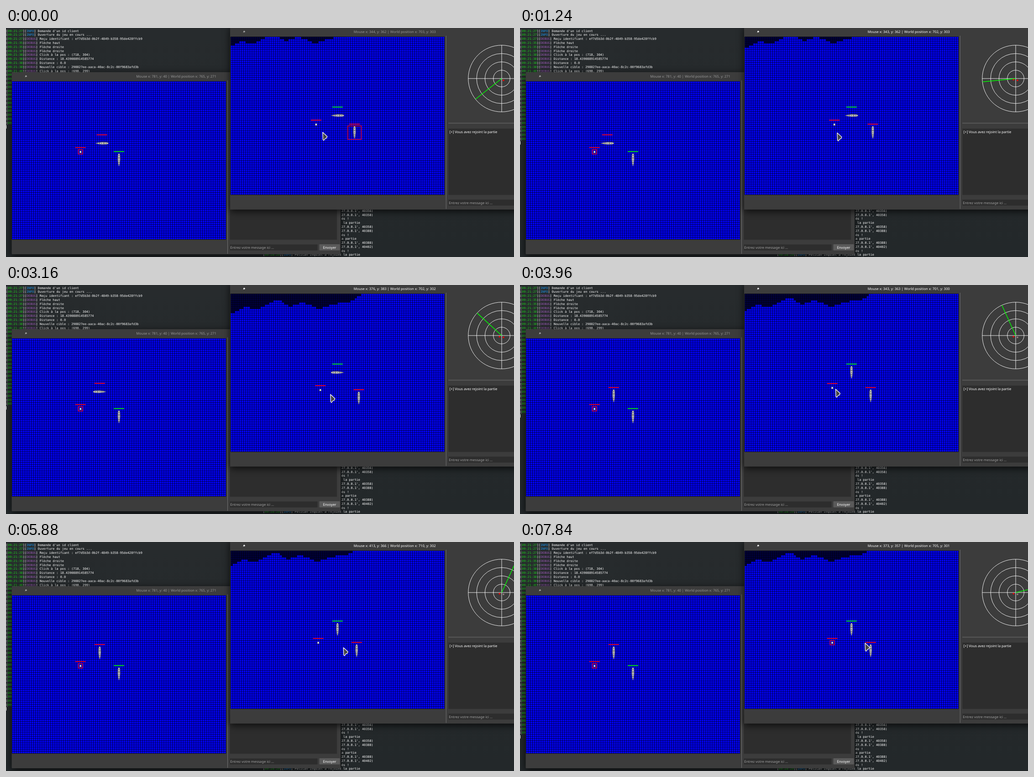
Write an HTML page that moves like this. It is 1113 by 503 pixels and loops after 8000 ms.

```html
<!DOCTYPE html>
<html lang="fr">
<head>
<meta charset="utf-8">
<title>Bataille navale</title>
<style>
  html, body { margin: 0; width: 100%; height: 100%; overflow: hidden; background: #25292b; }
  svg { display: block; width: 1113px; height: 503px; }
  text { white-space: pre; text-rendering: geometricPrecision; fill: #fff; }
  .term text { font: 6.8px "DejaVu Sans Mono", monospace; }
  .ui { font: 7.72px "Noto Sans", sans-serif; }
  .title { font: 7.58px "Noto Sans", sans-serif; text-anchor: middle; fill: #989898; }
  .hint { fill: #a2a2a2; }
  .time { fill: #1fd41f; }
  .INFO { fill: #1d99f3; }
  .DEBUG { fill: #9b59b6; }
  .window { filter: drop-shadow(0 4px 8px rgba(0, 0, 0, .75)); }
  .frame { fill: #3c3c3c; }
  .field { fill: #2d2d2d; stroke: #333; stroke-width: .6; }
  .rule { stroke: #777; stroke-width: .9; }
  .pin { fill: #aaa; }
  .focus { fill: #fff; }
  .grid { stroke: #000; stroke-width: .68; fill: none; }
  .pick { fill: none; stroke: #f00; stroke-width: 1.3; }
  .radar { fill: none; stroke: #fff; stroke-width: .9; }
</style>
</head>
<body>
<svg viewBox="0 0 1113 503">
  <defs>
    <linearGradient id="back" x2="0" y2="1">
      <stop offset="0" stop-color="#272b2d"/>
      <stop offset="1" stop-color="#23282a"/>
    </linearGradient>
    <clipPath id="view"><rect x="492" y="19" width="469" height="347"/></clipPath>
    <path id="pin" d="M-.6 -2.4 2.6 .3 1 .6 .2 2-1 .9-2.8 2.8-1.6 .3-2.4-.8-.9-.9Z"/>
    <g id="ship">
      <path d="M14.3 0 8 -1.8-2-2.7-11-2.3-14.3-1V1L-11 2.3-2 2.7 8 1.8Z" fill="#c4c4c4" stroke="#333" stroke-width=".5"/>
      <path d="M-11 0H-8M-6 -1H-3M-6 1H-3M-1 0H2M4 -.6H6M4 .6H6M8 0H10" stroke="#303030" stroke-width=".9"/>
    </g>
    <path id="boat" d="M-2 2.4V-.6L-.8 -2.3H.8L2 -.6V2.4Z" fill="#ddd" stroke="#222" stroke-width=".5"/>
  </defs>

  <rect width="1113" height="503" fill="url(#back)"/>
  <g id="term" class="term"></g>

  <g class="window">
    <rect class="frame" x="12.5" y="97" width="720.5" height="400" rx="1.5"/>
    <rect class="field" x="490.5" y="380" width="234.5" height="85"/>
    <rect class="field" x="490.5" y="475.5" width="192" height="13" rx="1"/>
    <rect x="686.5" y="475" width="45" height="13.5" rx="1" fill="#5a5a5a"/>
    <path class="rule" d="M485.5 115V496"/>
  </g>
  <use href="#pin" class="pin" x="44" y="106"/>
  <text class="title" x="373" y="109.3">Mouse x: 781, y: 40 | World position x: 765, y: 271</text>
  <text class="ui hint" x="491.3" y="484.5">Entrez votre message ici ...</text>
  <text class="ui" x="694.5" y="484.5">Envoyer</text>

  <g class="window">
    <rect class="frame" x="491" y="-4" width="640" height="402.8"/>
    <rect class="field" x="969.3" y="221" width="160" height="145.5"/>
    <rect class="field" x="969.3" y="377" width="160" height="13"/>
    <path class="rule" d="M964.3 17V397.5M969 209H1113"/>
  </g>
  <use id="pinR" href="#pin" class="pin" x="522" y="8"/>
  <text id="title" class="title" x="851.7" y="11.3"></text>
  <text class="ui" x="971.8" y="230.6">[+] Vous avez rejoint la partie</text>
  <text class="ui hint" x="970.3" y="386.6">Entrez votre message ici ...</text>

  <g id="radar" class="radar"><path d="M1012.8 111H1113M1086 37.8V184.2"/></g>
  <path id="sweep" d="M1086 111h73" stroke="#0f0" stroke-width="1.4"/>
  <circle id="blipA" cx="1081.3" cy="113.5" r="1.8" fill="#f00"/>
  <circle id="blipB" cx="1090" cy="115" r="1.8" fill="#f00"/>

  <rect x="13" y="117" width="469" height="347" fill="#00f"/>
  <rect x="492" y="19" width="469" height="347" fill="#00f"/>
  <g clip-path="url(#view)"><path id="land" fill="#00003c"/></g>
  <g id="units"></g>
  <path id="cursor" d="M.3 .5 10.2 9.6 8.8 13.2 6 14 2.8 18.4 1 17Z" fill="#454545" stroke="#fff" stroke-width="1.3" stroke-linejoin="round"/>
</svg>
<script>
const LOOP = 8000, CELL = 4.686, COLS = 100, LINES = 74, ROW = 8.78;
const SEA = { left: [13.3, 117.8], right: [492.2, 19.6] };
const $ = id => document.getElementById(id);

function add(parent, tag, attrs, text) {
  const el = document.createElementNS('http://www.w3.org/2000/svg', tag);
  for (const k in attrs) el.setAttribute(k, attrs[k]);
  if (text) el.textContent = text;
  return parent.appendChild(el);
}
const place = (el, x, y) => el.setAttribute('transform', `translate(${x} ${y})`);
const show = (el, on) => el.style.display = on ? '' : 'none';

// Values at t along straight pieces between [t, ...values] points
function along(points, t) {
  const i = points.findLastIndex(p => p[0] <= t);
  const a = points[i], b = points[i + 1] || a;
  const p = a === b ? 0 : (t - a[0]) / (b[0] - a[0]);
  return a.slice(1).map((v, j) => v + (b[j + 1] - v) * p);
}

// Terminal output
function logLine(x, y, time, level, message) {
  const line = add($('term'), 'text', { x, y: y + 2.4 });
  const span = (cls, s) => add(line, 'tspan', { class: cls }, s);
  span('', '['); span('time', '09:' + time); span('', '][');
  span(level, level); span('', '] ' + message);
  return line;
}
[
  ['21:27', 'INFO', "Demande d'un id client"],
  ['21:27', 'INFO', 'Ouverture du jeu en cours ...'],
  ['21:27', 'DEBUG', 'Reçu identifiant : ef7d5b3d-0b2f-4849-b358-95de428ffcb9'],
  ['21:35', 'DEBUG', 'Flèche haut'],
  ['21:35', 'DEBUG', 'Flèche droite'],
  ['21:37', 'DEBUG', 'Flèche droite'],
  ['21:38', 'DEBUG', 'Click à la pos : (718, 304)'],
  ['21:38', 'DEBUG', 'Distance : 18.439088914585774'],
  ['21:38', 'DEBUG', 'Distance : 0.0'],
  ['21:38', 'DEBUG', 'Nouvelle cible : 298827ee-aaca-40ac-8c2c-00f9683afd3b'],
  ['21:40', 'DEBUG', 'Click à la pos : (698, 299)']
].forEach((l, i) => logLine(0, 6.3 + i * ROW, ...l));

const rows = Array.from({ length: 37 }, (_, i) => logLine(0, 103 + i * ROW, '21:40', 'DEBUG', ''));
const caret = add($('term'), 'rect', { width: 1, height: 7.5, fill: '#fff' });

const port = n => `27.0.0.1', ${n})`;
[port(40356), port(40358), 'és !', ' la partie', port(40358), port(40388), 'és !', 'a partie',
  port(40388), port(40402), 'és !'
].forEach((s, i) => add($('term'), 'text', { x: 735, y: 403.9 + i * ROW }, s));
logLine(563, 498, '28:29', 'INFO', 'Pélican inquiet a rejoint la partie');

for (let i = 1; i <= 4; i++) add($('radar'), 'circle', { cx: 1086, cy: 111, r: 18.3 * i });

// Sea grids and stepped coast
for (const [x, y] of Object.values(SEA)) {
  let d = '';
  for (let i = 0; i <= COLS; i++) d += `M${x + i * CELL} ${y}v${LINES * CELL}`;
  for (let i = 0; i <= LINES; i++) d += `M${x} ${y + i * CELL}h${COLS * CELL}`;
  $('units').before(add($('units').parentNode, 'path', { class: 'grid', d }));
}

// Ridges and bays as [column, depth in cells]
const COAST = [[0, 9], [8, 9], [14, 6], [20, 7], [30, 2.6], [35, 6.2], [41, 3.8], [49, 7], [58, 4.2], [64, 3.4], [69, 0]];
let coast = 'M-200 -200';
for (let c = 0; c < 69; c++) {
  const depth = Math.round(along(COAST, c)[0]);
  coast += `V${SEA.right[1] + depth * CELL}H${SEA.right[0] + (c + 1) * CELL}`;
}
$('land').setAttribute('d', coast + 'V-200Z');

// Units: sprite, life bar and selection frame
function unit(sprite, bar, lift, half) {
  const g = add($('units'), 'g', {});
  const body = add(g, 'use', { href: sprite });
  add(g, 'rect', { x: -11.5, y: -lift - .9, width: 23, height: 1.8, fill: bar });
  const pick = add(g, 'rect', { class: 'pick', x: -half, y: -half, width: 2 * half, height: 2 * half });
  return (x, y, angle, picked) => {
    place(g, x, y);
    body.setAttribute('transform', `rotate(${angle})`);
    show(pick, picked);
  };
}
const ship = bar => unit('#ship', bar, 18.6, 14.8);
const boat = () => unit('#boat', '#f00', 9.4, 4.8);
const left = { mover: ship('#f00'), boat: boat(), other: ship('#0f0') };
const right = { mover: ship('#0f0'), boat: boat(), other: ship('#f00') };
left.boat(163.2, 272, 0, true);
left.other(247.5, 290, 90, false);

// Ship orders: start, end, cells right, cells down
const MOVES = [[960, 1600, -10, 0], [1600, 2000, 0, -4], [2240, 3080, 9, 0], [3320, 4080, 0, 2]];
// Clicks: time, lines logged, unit then selected
const CLICKS = [[0, 13, 'other'], [640, 4], [2200, 2], [3440, 2], [4300, 3, 'boat'], [4920, 3, 'boat'],
  [5500, 3], [6440, 4, 'other'], [7700, 3, 'boat']];
// Pointer stops: time, x, y in map pixels
const MOUSE = [[0, 344, 362], [1240, 343, 362], [2200, 378, 387], [3080, 376, 383], [4200, 334, 358],
  [5060, 331, 354], [6440, 478, 375], [6600, 518, 428], [7480, 333, 342], [7810, 373, 357], [7890, 450, 350]];

function shipAt(t) {
  let x = 0, y = 0, angle = 180;
  for (const [start, end, dx, dy] of MOVES) {
    if (t < start) break;
    const p = Math.min(1, (t - start) / (end - start));
    x += dx * p;
    y += dy * p;
    angle = Math.atan2(dy, dx) * 180 / Math.PI;
  }
  return { x: Math.round(x), y: Math.round(y), angle };
}

// The recording starts still, runs, hangs, then goes on at a slower rate
function refresh(t) {
  if (t < 320) return 0;
  if (t < 1240) return t - t % 80;
  return t < 2200 ? 1240 : t - (t - 2200) % 110;
}

function draw(t) {
  // The own view trails the other player's; the title trails further.
  const ahead = shipAt(t), cam = shipAt(t - 120), told = shipAt(t - 400);
  const clicks = CLICKS.filter(c => c[0] <= t), pick = clicks.at(-1)[2];
  const dx = -cam.x * CELL, dy = -cam.y * CELL;

  left.mover(210 + ahead.x * CELL, 253.2 + ahead.y * CELL, ahead.angle, false);
  right.mover(726.3, 192.2, cam.angle, false);
  right.boat(679.4 + dx, 211.8 + dy, 0, pick === 'boat');
  right.other(763.6 + dx, 229.8 + dy, 90, pick === 'other');
  place($('land'), dx - 10 * CELL, dy - 4 * CELL);

  $('sweep').setAttribute('transform', `rotate(${141.7 + t * .02625} 1086 111)`);
  show($('blipA'), t >= 800);
  $('blipB').setAttribute('fill', t < 3960 ? '#f00' : '#a08888');

  const [px, py] = along(MOUSE, t + 80);
  place($('cursor'), 492 + px * .5858, 16.5 + py * .5858);

  const [mx, my] = along(MOUSE, t).map(Math.round);
  const wx = 660 + told.x + Math.floor(mx / 8), wy = 258 + told.y + Math.round(my / 8);
  $('title').textContent = `Mouse x: ${mx}, y: ${my} | World position x: ${wx}, y: ${wy}`;
  for (const id of ['title', 'pinR']) $(id).classList.toggle('focus', t > 0);

  const count = clicks.reduce((n, c) => n + c[1], 0);
  rows.forEach((row, i) => show(row, i < count));
  caret.setAttribute('y', 99.3 + count * ROW);
}

let shown = -1;
function frame(now) {
  const t = refresh(now % LOOP);
  if (t !== shown) draw(shown = t);
  requestAnimationFrame(frame);
}
frame(0);
</script>
</body>
</html>
```
